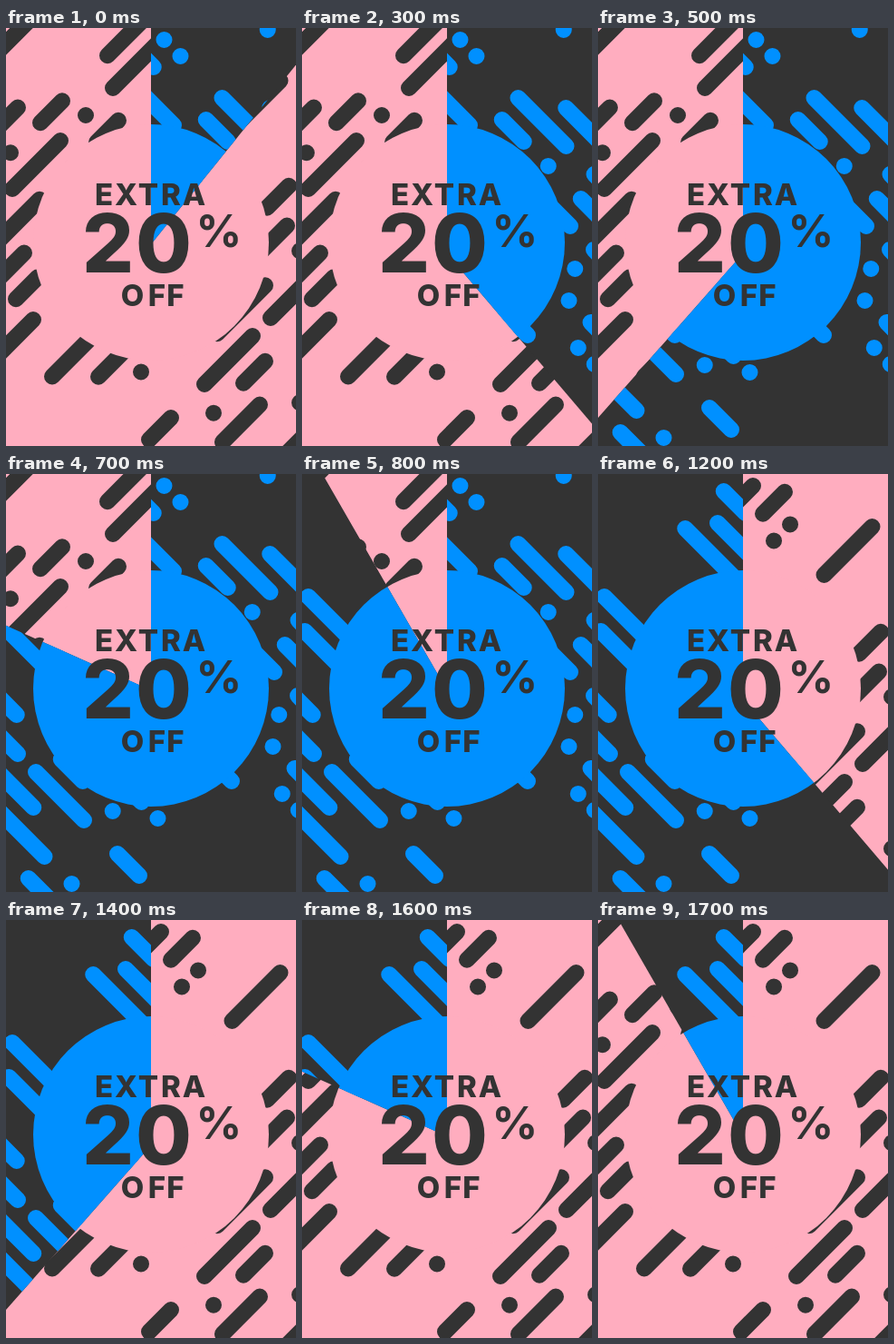
An HTML page for the animation above (1.8 s loop, 320 by 460 pixels).

```html
<!DOCTYPE html>
<html lang="en">
<head>
<meta charset="utf-8">
<title>Extra 20% off</title>
<style>
  html, body { margin: 0; width: 100%; height: 100%; overflow: hidden; background: #333; }
  svg { display: block; width: 320px; height: 460px; }
  .marks { fill: none; stroke-width: 18; stroke-linecap: round; }
  text { font-family: Inter, "Open Sans", sans-serif; font-weight: 800; fill: #333; text-anchor: middle; }
</style>
</head>
<body>
<svg viewBox="0 0 320 460">
  <defs>
    <path id="tile"/>
    <g id="pattern">
      <use href="#tile"/>
      <use href="#tile" x="-375" y="-425"/>
    </g>
    <clipPath id="wedge"><path id="sector"/></clipPath>
  </defs>
  <rect width="320" height="460" fill="#ffadbf"/>
  <use href="#pattern" class="marks" stroke="#333"/>
  <circle cx="160" cy="236" r="130" fill="#ffadbf"/>
  <g clip-path="url(#wedge)">
    <rect width="320" height="460" fill="#333"/>
    <!-- the same pattern, a quarter turn anticlockwise -->
    <use href="#pattern" class="marks" stroke="#0090ff" transform="matrix(0 -1 1 0 119 225)"/>
    <circle cx="160" cy="236" r="130" fill="#0090ff"/>
  </g>
  <text x="108 132.5 157 182 207.5" y="195" font-size="33">EXTRA</text>
  <text x="112.5 174" y="269" font-size="89.5">20</text>
  <text x="235" y="241" font-size="50" style="font-weight:700">%</text>
  <text x="139.5 166.5 187" y="306" font-size="33">OFF</text>
</svg>
<script>
  const STEP = 100, CX = 160, CY = 238, SAG = 13.5, REACH = 600;
  // Hand angle at each step of one sweep
  const SWEEP = [39, 79, 110, 139.5, 180, 221.5, 257, 294, 330];

  // Marks lie on evenly spaced diagonal lanes; each kind has one horizontal run
  const LANE = 41.75;
  const RUN = { dot: 0.01, stub: 24, rod: 41, bar: 53 };
  const UPPER = [
    { stub: [-113], bar: [-18] },
    { dot: [-145, -127] },
    { stub: [-123], dot: [-75], bar: [-40] },
    { dot: [-40, 5], stub: [38], bar: [112] },
    { stub: [-43], bar: [7, 118], dot: [88] },
    { bar: [-16], dot: [73], stub: [100, 182] },
    { bar: [-33, 95], stub: [40], dot: [194, 212] },
    { stub: [11], bar: [84] },
    { bar: [-23] },
    { dot: [223] },
    { bar: [51] }
  ];
  const LOWER = [
    { bar: [249.5] }, {}, {},
    { bar: [102], stub: [288] },
    { dot: [149], bar: [179, 257] },
    { bar: [233], dot: [324] },
    { stub: [158], bar: [219, 292] },
    { dot: [229], stub: [262], bar: [335] },
    { dot: [221], rod: [239] },
    { dot: [324], bar: [374] },
    { bar: [310, 412] }
  ];

  const el = id => document.getElementById(id);

  // On a lane, x + y is constant
  function lanes(rows, first) {
    return rows.map((row, i) => Object.entries(row).map(([kind, starts]) =>
      starts.map(x => `M${x} ${first + i * LANE - x}l${RUN[kind]} ${-RUN[kind]}`).join("")
    ).join("")).join("");
  }

  function sector(deg, opening) {
    const a = deg * Math.PI / 180;
    const pivot = CY + SAG * Math.max(0, -Math.cos(a));
    const rim = `${CX + REACH * Math.sin(a)} ${pivot - REACH * Math.cos(a)}`;
    const noon = `${CX} ${CY - REACH}`;
    const [from, to] = opening ? [noon, rim] : [rim, noon];
    const large = (opening ? deg : 360 - deg) > 180 ? 1 : 0;
    return `M${CX} ${pivot}L${from}A${REACH} ${REACH} 0 ${large} 1 ${to}Z`;
  }

  function draw(ms) {
    const step = Math.floor(ms / STEP) % (2 * SWEEP.length);
    const opening = step < SWEEP.length;
    el("sector").setAttribute("d", sector(SWEEP[step % SWEEP.length], opening));
  }

  el("tile").setAttribute("d", lanes(UPPER, 17) + lanes(LOWER, 360.5));

  const start = performance.now();
  function tick(now) {
    draw(Math.max(0, now - start));
    requestAnimationFrame(tick);
  }
  draw(0);
  requestAnimationFrame(tick);
</script>
</body>
</html>
```
